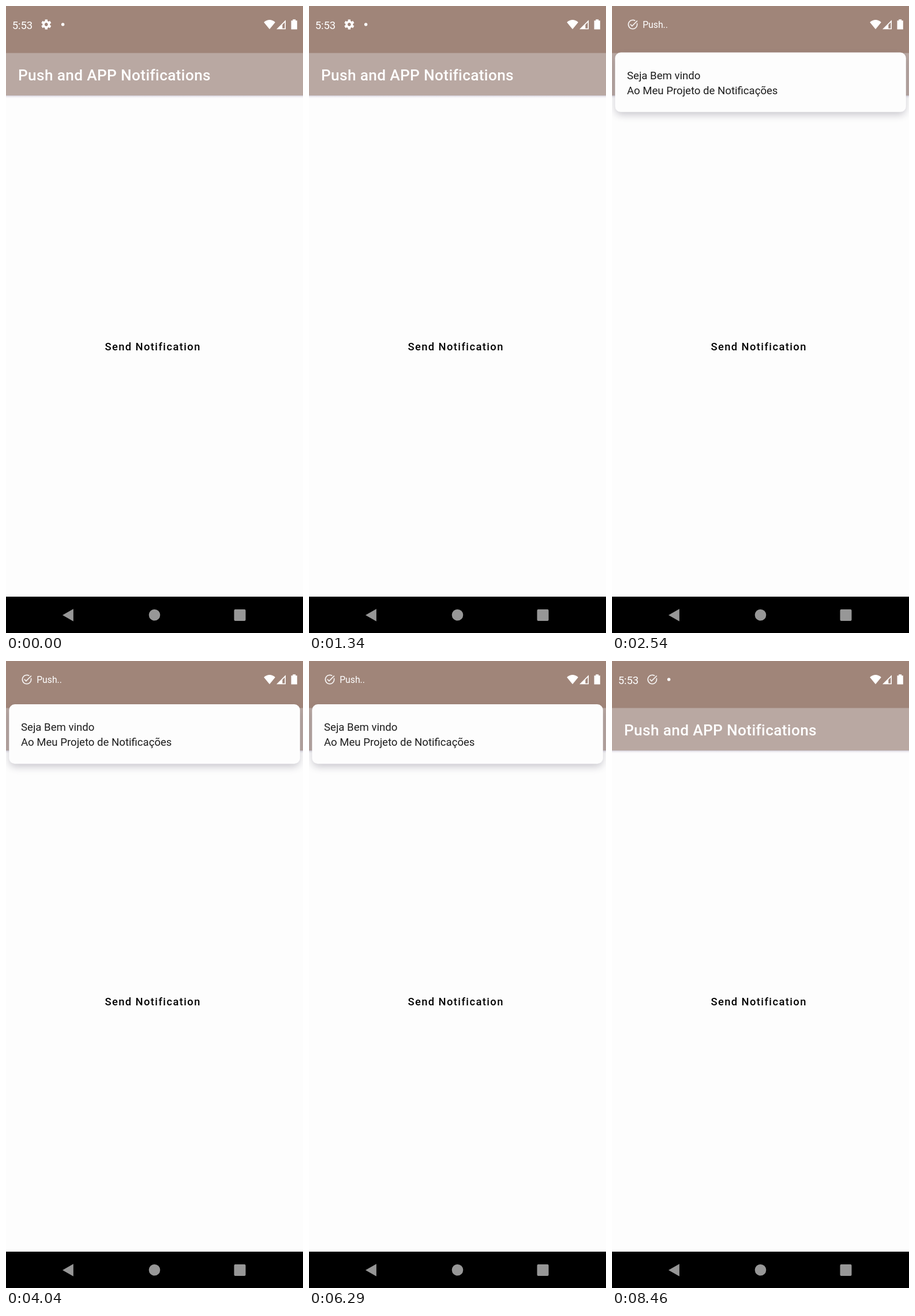
An HTML page for the animation above (8.5 s loop, 515x1087 px).

```html
<!DOCTYPE html>
<html lang="en">
<head>
<meta charset="utf-8">
<title>Push and APP Notifications</title>
<style>
  html, body { margin: 0; width: 100%; height: 100%; overflow: hidden; background: #fdfdfd; }
  svg { display: block; width: 515px; height: 1087px; font-family: Roboto, sans-serif; }
  .title { font-size: 26.25px; font-weight: 500; letter-spacing: .33px; }
  .button { font-size: 18.375px; font-weight: 500; letter-spacing: 1.4px; }
  .note { font-size: 18.6px; fill: #1d1d1d; }
  .clock { font-size: 18.4px; }
  .ticker { font-size: 15.75px; }
</style>
</head>
<body>
<svg viewBox="0 0 515 1087">
  <defs>
    <linearGradient id="barShade" x2="0" y2="1">
      <stop stop-color="#c9c4cc"/>
      <stop offset=".4" stop-color="#efedf2"/>
      <stop offset="1" stop-color="#fdfdfd"/>
    </linearGradient>
    <filter id="blur" x="-10%" y="-40%" width="120%" height="180%">
      <feGaussianBlur stdDeviation="7"/>
    </filter>
    <g id="gear" fill="none" stroke="#fff">
      <circle r="4.7" stroke-width="3.6"/>
      <g id="teeth" stroke-width="4.4"></g>
    </g>
    <path id="check" fill="#fff" fill-opacity=".87" transform="scale(.85) translate(-12 -12)"
      d="M22 5.18L10.59 16.6l-4.24-4.24 1.41-1.41 2.83 2.83 10-10zM19.79 10.22c.13.57.21 1.17.21 1.78a8 8 0 1 1-3.72-6.75l1.44-1.44A10 10 0 1 0 21.4 8.61z"/>
  </defs>

  <rect width="515" height="1087" fill="#fdfdfd"/>
  <rect width="515" height="82" fill="#a08579"/>
  <rect y="81.5" width="515" height="73.5" fill="#b9a8a2"/>
  <rect y="155" width="515" height="5" fill="url(#barShade)"/>
  <text class="title" x="21" y="129" fill="#fff">Push and APP Notifications</text>
  <text class="button" x="171.4" y="597">Send Notification</text>

  <g id="card">
    <rect x="6" y="82" width="503" height="101" rx="10" fill="#3c3850" opacity=".28" filter="url(#blur)"/>
    <rect x="5.3" y="75" width="504.5" height="103.3" rx="10" fill="#fdfdfd"/>
    <text class="note" x="26" y="121.3">Seja Bem vindo</text>
    <text class="note" x="26" y="147.2">Ao Meu Projeto de Notificações</text>
  </g>

  <g id="idle" fill="#fff">
    <text class="clock" x="10.7" y="39.5">5:53</text>
    <use id="gearIcon" href="#gear" x="69.8" y="32"/>
    <use id="checkIcon" href="#check" x="69.8" y="32"/>
    <circle cx="98.6" cy="32" r="2.7"/>
  </g>
  <g id="alert" fill="#fff">
    <use href="#check" x="36" y="32"/>
    <text class="ticker" x="53.2" y="38.2">Push..</text>
  </g>

  <g fill="#fff">
    <path d="M447.2 28.2Q457 20 466.8 28.2L457 40.3z"/>
    <path fill-rule="evenodd" d="M469 40.3H485V24.2zM479.3 32.5V38.8H483.4V28.3z"/>
    <path d="M497.2 23.2h5v2h2.6v15.2h-10.3V25.2h2.7z"/>
  </g>

  <rect y="1024" width="515" height="63" fill="#000"/>
  <g fill="#979797">
    <path d="M98 1056L116.8 1045.2V1066.8z"/>
    <circle cx="257.5" cy="1055.7" r="9.8"/>
    <rect x="395.5" y="1046" width="20" height="20" rx="2"/>
  </g>
</svg>
<script>
  const LOOP = 8500;
  const APPEAR = { at: 2240, length: 550 };
  const LEAVE = { at: 7960, length: 230 };
  const el = id => document.getElementById(id);
  const clamp = v => Math.max(0, Math.min(1, v));
  const ramp = (t, at, length) => clamp((t - at) / length);
  const smooth = p => p * p * (3 - 2 * p);
  const mix = (a, b, p) => a + (b - a) * p;
  const fade = (node, value) => node.setAttribute('opacity', value);

  const [card, idle, alertBar, gearIcon, checkIcon] =
    ['card', 'idle', 'alert', 'gearIcon', 'checkIcon'].map(el);

  el('teeth').innerHTML = Array.from({ length: 6 }, (_, i) =>
    `<path d="M0-5V-8.6" transform="rotate(${i * 60})"/>`).join('');

  // Drop in, overshoot, bounce back a little and settle.
  function dropOffset(p) {
    if (p < .5) return mix(-62, 6, smooth(p / .5));
    if (p < .8) return mix(6, -1.2, smooth((p - .5) / .3));
    return mix(-1.2, 0, smooth((p - .8) / .2));
  }

  function draw(t) {
    const enter = ramp(t, APPEAR.at, APPEAR.length);
    const leave = ramp(t, LEAVE.at, LEAVE.length);
    const y = dropOffset(enter) - 73 * leave * leave;
    card.setAttribute('transform', `translate(0 ${y})`);
    fade(card, ramp(t, APPEAR.at, 110) * (1 - leave));

    const hidden = ramp(t, APPEAR.at, 110);
    const back = ramp(t, LEAVE.at + 200, 110);
    fade(idle, 1 - hidden + back);
    fade(alertBar, ramp(t, APPEAR.at + 90, 110) * (1 - ramp(t, LEAVE.at + 120, 110)));

    const arrived = t >= APPEAR.at + 200;
    fade(gearIcon, arrived ? 0 : 1);
    fade(checkIcon, arrived ? 1 : 0);
  }

  const start = performance.now();
  function tick() {
    draw((performance.now() - start) % LOOP);
    requestAnimationFrame(tick);
  }
  tick();
</script>
</body>
</html>
```
